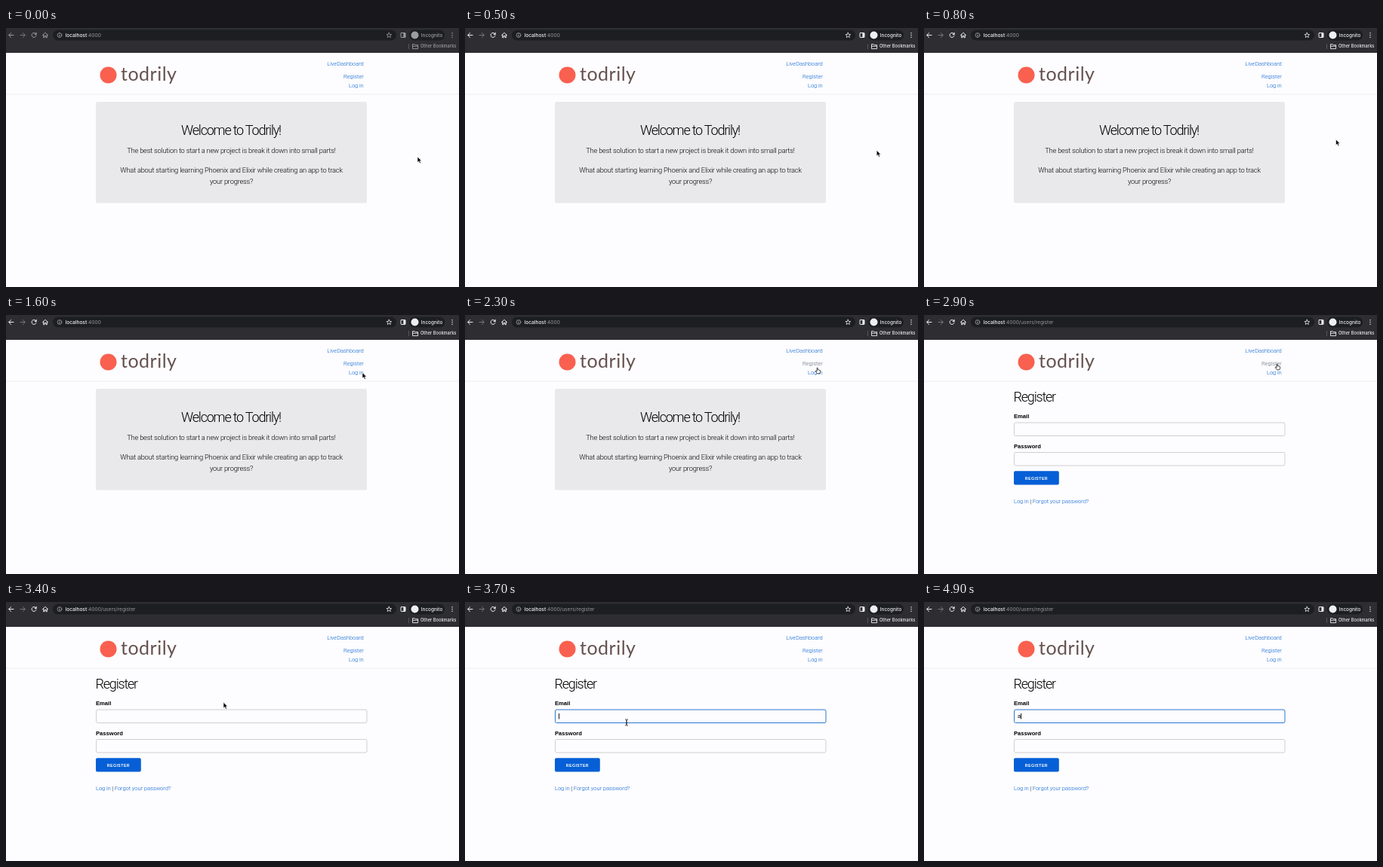
Write an HTML page that moves like this. It is 600 by 344 pixels and loops after 5000 ms.

```html
<!DOCTYPE html>
<html lang="en">
<head>
<meta charset="utf-8">
<title>Sign-up demo</title>
<style>
html, body { margin: 0; width: 100%; height: 100%; overflow: hidden; background: #fdfcfe; }
svg { display: block; width: 600px; height: 344px; }
text { font: 300 7.6px Roboto, "Liberation Sans", sans-serif; letter-spacing: -.09px; fill: #000; white-space: pre; }
.ui text { font: 500 6.6px Inter, sans-serif; letter-spacing: 0; fill: #f5f5f7; }
.ui tspan.dim { fill: #97989c; font-weight: 400; }
.ui { --ink: #9b9ca0; }
.ui.active { --ink: #eeeff2; }
.ui .tint { fill: var(--ink); }
.ui .incognito { font-size: 6.4px; fill: var(--ink); }
.ui .bookmarks { font-size: 5.7px; fill: var(--ink); }
.line { fill: none; stroke: var(--ink); stroke-width: 1; stroke-linecap: round; stroke-linejoin: round; }
.link { fill: #0060d2; }
.link.hover { fill: #606c76; }
.brand { font: 400 25px Lato, sans-serif; fill: #65524f; letter-spacing: .5px; }
.title { font-size: 18px; letter-spacing: -1.2px; }
.lead { font-size: 9.3px; letter-spacing: -.21px; }
.label { font: 700 7.6px "Liberation Sans", Arial, sans-serif; letter-spacing: 0; }
.button { font: 700 5.2px "Liberation Sans", Arial, sans-serif; fill: #fff; letter-spacing: .47px; }
.field { fill: #fdfcfe; stroke: #cfced1; }
.field.focus { stroke: #2b78d2; }
.mid { text-anchor: middle; }
.end { text-anchor: end; }
</style>
</head>
<body>
<svg viewBox="0 0 600 344">
  <rect width="600" height="344" fill="#fdfcfe"/>

  <g class="ui" id="ui">
    <rect width="600" height="33" fill="#2e2e32"/>
    <rect x="62" y="2.5" width="455" height="14" rx="7" fill="#1d1e21"/>
    <path class="line" d="M10 9.5H4M6.7 6.5L3.7 9.5L6.7 12.5"/>
    <path class="line" style="stroke:#77787c" d="M19 9.5H25M22.3 6.5L25.3 9.5L22.3 12.5"/>
    <g id="reload">
      <path class="line" d="M39.3 7.4A3 3 0 1 0 40 10.2"/>
      <path class="tint" d="M40.6 5.6V8.9H37.3Z"/>
    </g>
    <path class="line" id="stop" d="M34.7 7.1L39.5 11.9M39.5 7.1L34.7 11.9"/>
    <path class="line" d="M48.6 9.6L52 6.2L55.4 9.6M49.7 9V12.7H51V10.6H53V12.7H54.3V9"/>
    <circle class="line" cx="71" cy="9.5" r="2.9" style="stroke:#a3a4a8;stroke-width:.8"/>
    <path class="line" style="stroke:#a3a4a8" d="M71 9.4V11M71 7.8V7.9"/>
    <text x="78.5" y="11.8">localhost<tspan class="dim" id="path">:4000</tspan></text>
    <path class="line" id="star" style="stroke-width:.8"/>
    <rect class="line" x="523" y="6.5" width="6" height="6" rx=".6"/>
    <rect class="tint" x="526.4" y="6.5" width="2.6" height="6"/>
    <rect x="534" y="2.5" width="47" height="14" rx="7" fill="#1d1e21"/>
    <circle class="tint" cx="541.5" cy="9.5" r="5"/>
    <text class="incognito" x="549.8" y="11.8">Incognito</text>
    <circle class="tint" cx="591" cy="6.8" r=".75"/>
    <circle class="tint" cx="591" cy="9.5" r=".75"/>
    <circle class="tint" cx="591" cy="12.2" r=".75"/>
    <path d="M533.5 21V28" stroke="#55565a"/>
    <path class="line" style="stroke-width:.9" d="M538.5 27.2V21.6H541.3L542.2 22.6H545.6V27.2ZM538.5 24.2H545.6"/>
    <text class="bookmarks" x="549" y="26.2">Other Bookmarks</text>
  </g>

  <path d="M0 88H600" stroke="#ecebee"/>
  <circle cx="135.5" cy="62.5" r="11" fill="#f9604f"/>
  <text class="brand" x="152" y="70">todrily</text>
  <text class="link end" x="473.7" y="50.2">LiveDashboard</text>
  <text class="link end" id="register" x="473.7" y="67.3">Register</text>
  <text class="link end" id="login" x="473.7" y="79.1">Log in</text>

  <g id="welcome">
    <rect x="119" y="98" width="359" height="134.5" rx="2.5" fill="#e9e8ea"/>
    <text class="title mid" x="298" y="142">Welcome to Todrily!</text>
    <text class="lead mid" x="298.5" y="166">The best solution to start a new project is break it down into small parts!</text>
    <text class="lead mid" x="298.5" y="192.3">What about starting learning Phoenix and Elixir while creating an app to track</text>
    <text class="lead mid" x="298.5" y="207.3">your progress?</text>
  </g>

  <g id="form">
    <text class="title" x="118.5" y="115">Register</text>
    <text class="label" x="119" y="137.4">Email</text>
    <rect class="field" id="email" x="119.5" y="143" width="358.5" height="17.5" rx="2"/>
    <text class="label" x="119" y="176.8">Password</text>
    <rect class="field" x="119.5" y="182.5" width="358.5" height="17.5" rx="2"/>
    <rect x="119" y="207.3" width="59.8" height="18.2" rx="1.9" fill="#065fd6"/>
    <text class="button" x="133.8" y="218.6">REGISTER</text>
    <text x="119" y="250.2"><tspan class="link">Log in</tspan> | <tspan class="link">Forgot your password?</tspan></text>
    <text id="typed" x="124" y="154.4" style="font-weight:400">a</text>
    <rect id="caret" y="148" width=".9" height="7.5"/>
  </g>

  <g id="cursor" stroke-linejoin="round">
    <path id="arrow" d="M0 0V7.6L1.8 6L3 8.8L4.4 8.2L3.2 5.5H5.5Z" fill="#000" stroke="#fff" stroke-width=".6"/>
    <path id="hand" transform="scale(.85)" d="M-1.6 -4.2Q-.9 -5 -.3 -4.2V-1.5Q.5 -2 1.1 -1.3Q1.9 -1.7 2.4 -.9Q3.5 -1.2 3.7 0V2L2.7 4.5H-1.2L-3.7 1Q-3.8 -.3 -2.6 .1L-1.6 1Z" fill="#fff" stroke="#111" stroke-width=".9"/>
    <path id="beam" d="M-2 -4.2Q0 -4.2 0 -3V3Q0 4.2 -2 4.2M2 -4.2Q0 -4.2 0 -3V3Q0 4.2 2 4.2M-1 .8H1" fill="none" stroke="#222" stroke-width=".8"/>
  </g>
</svg>
<script>
const $ = id => document.getElementById(id);
const show = (id, on) => { $(id).style.display = on ? "" : "none"; };
const clamp = v => Math.max(0, Math.min(1, v));

// time, x, y of the pointer
const track = [
  [0, 545, 171], [200, 545, 172], [300, 545, 172], [800, 545.5, 148], [900, 545.5, 148],
  [1200, 520, 120], [1500, 482, 84], [1600, 472, 76.5], [1700, 467, 81], [1800, 466.5, 81.5],
  [1900, 466.5, 81.5], [2000, 466.5, 82], [2200, 466.5, 82], [2300, 467.5, 74], [2400, 468.5, 69],
  [2900, 468.5, 69], [3200, 400, 96], [3500, 232, 152], [3600, 214, 160], [5000, 214, 160]
];

function pointer(t) {
  const i = track.findIndex(k => k[0] > t);
  const [t0, x0, y0] = track[i - 1], [t1, x1, y1] = track[i];
  const p = (t - t0) / (t1 - t0);
  return [x0 + (x1 - x0) * p, y0 + (y1 - y0) * p];
}

function starPath(cx, cy, r) {
  let d = "";
  for (let i = 0; i < 10; i++) {
    const a = i * Math.PI / 5, s = i % 2 ? r * .45 : r;
    d += (i ? "L" : "M") + (cx + s * Math.sin(a)) + " " + (cy - s * Math.cos(a));
  }
  return d + "Z";
}

function render(ms) {
  const t = Math.floor(ms % 5000 / 100) * 100;
  const onForm = t >= 2900, loading = t >= 2700 && !onForm;
  const focused = t >= 3600, typed = t >= 4900;
  const overLogin = t >= 1700 && t < 2300, overRegister = t >= 2300 && t < 3000;

  $("ui").classList.toggle("active", t >= 400);
  show("reload", !loading);
  show("stop", loading);
  $("path").textContent = onForm ? ":4000/users/register" : ":4000";
  $("login").classList.toggle("hover", overLogin);
  $("register").classList.toggle("hover", overRegister);
  show("welcome", !onForm);
  show("form", onForm);

  $("email").classList.toggle("focus", focused);
  show("typed", typed);
  show("caret", focused);
  $("caret").setAttribute("x", typed ? 128.2 : 124);
  $("caret").setAttribute("opacity", t < 4500 ? clamp((4400 - t) / 300) : clamp((t - 4500) / 300));

  const [x, y] = pointer(t);
  const hand = overLogin || overRegister;
  const beam = onForm && x < 478 && y > 143 && y < 161;
  $("cursor").setAttribute("transform", `translate(${x} ${y})`);
  show("cursor", !typed);
  show("hand", hand);
  show("beam", beam);
  show("arrow", !hand && !beam);
}

$("star").setAttribute("d", starPath(507.3, 9.7, 3.5));
function loop() {
  render(performance.now());
  requestAnimationFrame(loop);
}
loop();
</script>
</body>
</html>
```
